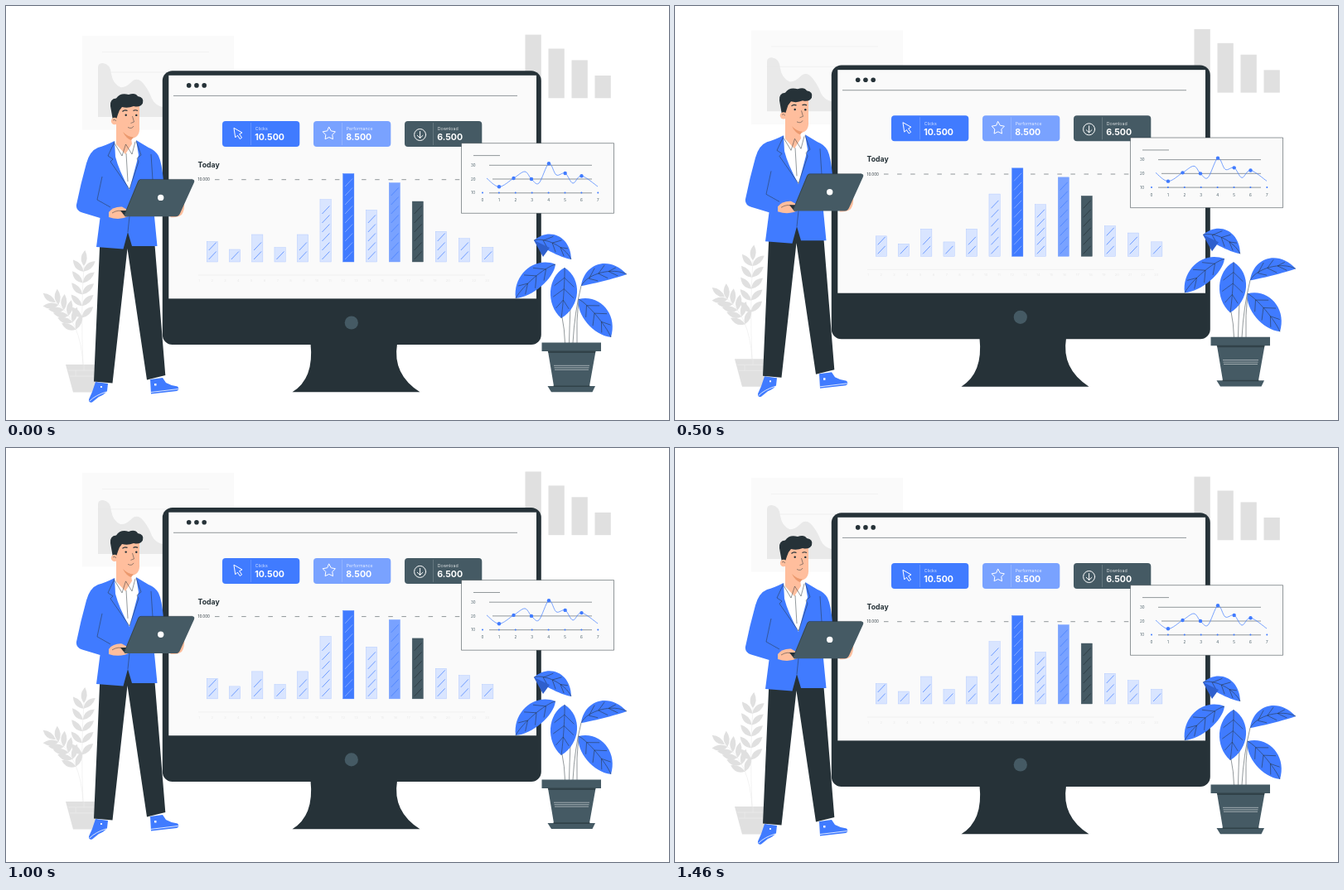
Write an HTML page that moves like this. It is 800x500 px and loops after 1500 ms.

```html
<!DOCTYPE html>
<html lang="en">
<head>
<meta charset="utf-8">
<title>Dashboard</title>
<style>
  html, body { margin: 0; width: 100%; height: 100%; overflow: hidden; background: #fff; }
  svg { display: block; width: 100vw; height: 100vh; }
  text { font-family: Inter, sans-serif; }
  .blue { fill: #407bff; }
  .dark { fill: #263238; }
  .slate { fill: #455a64; }
  .skin { fill: #ffbe9d; }
  .pale { fill: #e0e0e0; }
  .paper { fill: #fafafa; }
  .ink { fill: none; stroke: #263238; stroke-width: .5; stroke-linejoin: round; }
  .mist { fill: none; stroke: #e6e6e6; stroke-width: .5; }
  .icon { fill: none; stroke: #fff; stroke-linejoin: round; stroke-linecap: round; }
</style>
</head>
<body>
<svg viewBox="0 0 800 500">
<g id="scene">
  <!-- background charts -->
  <rect class="paper" x="92" y="36" width="183" height="113.5"/>
  <path d="M111 134V74Q111 69 117 69Q126 70 127 82Q129 94 138 98Q144 99 150 93Q158 84 166 94Q173 103 176 112Q180 120 189 122V134Z" fill="#e9e9e9"/>
  <path class="mist" d="M116 55.7H245M111 80H245"/>
  <g id="steps" class="pale"></g>

  <!-- pale plant -->
  <g id="shrub" class="pale"></g>
  <path class="pale" d="M72 433H115L108 466.5H81Z"/>
  <path d="M75 440H112M77 447H112M84 440V447M94 433V440" fill="none" stroke="#ededed" stroke-width=".6"/>

  <!-- monitor -->
  <path class="dark" d="M367.5 408Q372 450 345.5 466.3H499.5Q466 445 472 408Z"/>
  <rect class="dark" x="188.8" y="78.2" width="457" height="330.8" rx="12"/>
  <rect class="paper" x="196.3" y="83.8" width="443.7" height="269.6"/>
  <circle class="slate" cx="416.8" cy="382.5" r="8.1"/>
  <g id="windowDots" class="dark"></g>
  <path class="ink" d="M202 108.4H617"/>

  <g id="tiles"></g>
  <path class="icon" d="M275.3 147.5L285 153L281.6 154.7L284.6 159L282.2 160.6L279.4 156.2L277 158.6Z"/>
  <path class="icon" id="star"/>
  <circle class="icon" cx="499.6" cy="155.5" r="7"/>
  <path class="icon" d="M499.6 151.5V159.5M496.3 156.4L499.6 159.5L502.9 156.4"/>

  <text class="dark" x="231.6" y="195" font-size="8.7" font-weight="700">Today</text>
  <text class="dark" x="231.6" y="211.4" font-size="4.5">10.000</text>
  <path class="ink" d="M252 209.7H549" stroke-dasharray="5.5 10.6"/>
  <g id="bars"></g>
  <path class="mist" d="M232 325H578"/>
  <g id="hours" font-size="4" fill="#e8e8e8" text-anchor="middle"></g>

  <!-- line chart card -->
  <rect class="ink" x="549.5" y="165.7" width="184" height="84.6" style="fill:#fafafa"/>
  <path class="ink" d="M564 180.6H596M583 192.3H707M587 209H707M583 225.8H707"/>
  <path id="trend" fill="none" stroke="#407bff" stroke-width=".7"/>
  <g id="marks" class="blue"></g>
  <g id="scales" class="slate" font-size="4.5" text-anchor="middle"></g>

  <!-- potted plant -->
  <path class="ink" d="M671 376Q674 390 674.5 407M681 364Q680 386 679.5 407M684 407Q686 370 694 338M691 354Q688 380 689 407"/>
  <g id="foliage"></g>
  <path d="M637 283L648 303L656 292Z" fill="#2f5fcc"/>
  <path class="slate" d="M646.5 406.5H718V417H711.5L704 459H711L707.5 466.2H658L653.5 459H661L654 417H646.5Z"/>
  <path class="dark" d="M653.5 416.5H711.5L711 419H654.5ZM660 458.4H705L704 460H661Z" opacity=".6"/>
  <path d="M661 434.3H704M661.5 436.8H703.5M662 439.2H703" stroke="#fff" stroke-width=".5"/>

  <!-- man -->
  <path class="blue" d="M108 454L123 456L122 465Q118 470 112 472L104 478.5Q100 480 100 475L104 466Z"/>
  <path class="blue" d="M174 451L189 449L193 455Q200 459 207 459.5Q210 463 206 465L175 468.5Z"/>
  <path d="M101 477Q108 470 121 466M175 466.5L208 462.5" fill="none" stroke="#fff" stroke-width=".8"/>
  <path d="M114 459h2v2h-2zM179 456h2.5v2.5h-2.5z" fill="#fff"/>
  <path class="dark" d="M114 270H178L192.3 446L170 451.5L146.5 293L128.5 455.5L106 453.5Z"/>
  <path class="skin" d="M130 114H161V146Q162 159 151 160L153 172L144 180L133 170V140Z"/>
  <path d="M141 152Q147 158 154 158.5L151 162Q145 160 141 152Z" fill="#eb996e"/>
  <path d="M131 165L144 179L155 162L163 172L152 222L147 222Z" fill="#fff"/>
  <path class="blue" d="M131 163Q119 169 111 171Q101 175 97 190Q90 215 85 240Q84 247 92 249.5L113.5 256L109 291L141.5 293.5L147 273L152 290L182.5 290L179 254L190 211Q188 189 184 181Q180 174 172 171L157 162L160 180L149 222Q136 198 132 182Z"/>
  <path class="ink" d="M131 164L123 181L129 185L126 188L149 221M157 163L163 180L158 184L160 188L149 221M131 166L140 181L144.5 167L152 179L156 164M145 178L147 212M116 206L110 234L126 243M175 179L177 210M149 254L147 273"/>
  <path class="dark" d="M129 138L126 121Q125 112 133 111.5Q138 104 148 107Q156 104 159 109Q167 110 165 117.5Q162 123 154 121Q147 124 140 122Q136 126 135 131L133 137Z"/>
  <circle class="skin" cx="131" cy="139" r="4.2"/>
  <path class="ink" d="M152.5 133L154.5 140L150.5 141.5M147 146.5Q152 149 154 145M129 138Q131 136 133 139"/>
  <path class="ink" d="M140.5 127.5Q143 125 146.5 126.5M153.5 126.5Q156 125 159 126.5" style="stroke-width:1.2"/>
  <g class="dark"><circle cx="144.7" cy="131.7" r="1.2"/><circle cx="157.3" cy="131.9" r="1.2"/></g>
  <path class="skin" d="M215 237Q216 246 212 252Q206 256 198 255Z"/>
  <path class="skin" d="M124 249Q129 242 140 242.5L148 247L151 252Q139 260 124 255Z"/>
  <path class="dark" d="M138 247H147V254.2H144Q141 251 138 247Z"/>
  <path class="slate" d="M162 209.4H225.5Q228 210 227 213L210 250.5Q208.5 254.2 205 254.2H144Q142 254 143 251L159 212Q160 209.4 162 209.4Z"/>
  <path class="ink" d="M143 252L160 211Q161 209.4 163 209.4H225M128 250Q136 245 143 249"/>
  <circle cx="186.7" cy="231.4" r="3.7" fill="#fff"/>
</g>
</svg>
<script>
const byId = id => document.getElementById(id);
const fill = (id, parts) => { byId(id).innerHTML = parts.join(''); };
const range = (n, make) => Array.from({ length: n }, (_, i) => make(i));
const rect = (x, y, w, h, extra = '') => `<rect x="${x}" y="${y}" width="${w}" height="${h}" ${extra}/>`;
const dot = (x, y, r) => `<circle cx="${x}" cy="${y}" r="${r}"/>`;

fill('steps', [76.7, 59.8, 45.9, 27.3].map((h, i) => rect(626.5 + i * 28, 111.3 - h, 19.3, h)));
fill('windowDots', range(3, i => dot(220.7 + i * 9.25, 95.9, 2.8)));

// A twig curves from the pot to its tip, with leaf pairs along it
function twig(bendX, bendY, tipX, tipY) {
  const rootX = 93, rootY = 433, pairs = 5;
  const mix = (a, b, c, s) => a * (1 - s) ** 2 + 2 * b * s * (1 - s) + c * s * s;
  const slope = (a, b, c, s) => (b - a) * (1 - s) + (c - b) * s;
  const leaves = range(pairs * 2 + 1, i => {
    const s = .4 + .6 * Math.ceil(i / 2) / pairs;
    const turn = i === 0 ? 0 : i % 2 ? 45 : -45;
    const along = i === 0 ? 1 : s - .06;
    const angle = Math.atan2(slope(rootY, bendY, tipY, along), slope(rootX, bendX, tipX, along)) * 180 / Math.PI;
    return `<path transform="translate(${mix(rootX, bendX, tipX, along)} ${mix(rootY, bendY, tipY, along)}) rotate(${angle + turn})" d="M0 0Q9 -8 19 0Q9 6 0 0"/>`;
  });
  return `<path class="mist" d="M${rootX} ${rootY}Q${bendX} ${bendY} ${tipX} ${tipY}"/>${leaves.join('')}`;
}
fill('shrub', [twig(90, 380, 60, 358), twig(90, 370, 94, 314)]);

// A leaf from base to tip, bulging a to its left and b to its right, with veins
function leaf(x0, y0, x1, y1, a, b) {
  const size = Math.hypot(x1 - x0, y1 - y0), angle = Math.atan2(y1 - y0, x1 - x0) * 180 / Math.PI;
  const side = h => `C${size * .2} ${h / .75} ${size * .75} ${h / .75} ${size} 0`;
  const edge = (s, h) => 4 * s * (1 - s) * h;
  const mid = (b - a) / 2;
  const veins = [.2, .42, .64].map(s => [-a, b].map(h =>
    `M${s * size} ${edge(s, mid)}L${(s + .17) * size} ${edge(s + .17, mid + (h - mid) * .8)}`).join('')).join('');
  return `<g transform="translate(${x0} ${y0}) rotate(${angle})">
    <path class="blue" d="M0 0${side(-a)}M0 0${side(b)}"/>
    <path class="ink" d="M0 0${side(mid)}${veins}"/></g>`;
}
fill('foliage', [
  leaf(637, 283, 682, 306, 18, 3), leaf(663, 312, 615, 353, 9, 18), leaf(674, 316, 670, 377, 17, 15),
  leaf(694, 338, 749, 324, 20, 1), leaf(691, 354, 730, 400, 18, 11)
]);

const tiles = [['#407bff', 'Clicks', '10.500'], ['#79a2ff', 'Performance', '8.500'], ['#455a64', 'Download', '6.500']];
fill('tiles', tiles.map(([color, label, value], i) => {
  const x = 261 + i * 110;
  return `${rect(x, 139, 93.3, 31, `rx="4" fill="${color}"`)}
    <path d="M${x + 34.5} 141V168" stroke="#fff" stroke-width=".3" opacity=".6"/>
    <g fill="#fff"><text x="${x + 39.8}" y="150.2" font-size="5.3" font-weight="300">${label}</text>
    <text x="${x + 39.2}" y="162.2" font-size="10.6" font-weight="700">${value}</text></g>`;
}));

const star = range(10, i => {
  const r = i % 2 ? 4.2 : 8, a = i * Math.PI / 5;
  return `${389.8 + r * Math.sin(a)} ${154.3 - r * Math.cos(a)}`;
});
byId('star').setAttribute('d', `M${star.join('L')}Z`);

const BASE = 309;
const heights = [24.5, 15, 33, 17.4, 33, 75.3, 106.5, 62.6, 95.5, 73, 36.7, 28.3, 17.5];
const accents = { 6: ['#407bff', '#9dbbff'], 8: ['#79a2ff', '#407bff'], 9: ['#455a64', '#263238'] };
fill('bars', heights.map((h, i) => {
  const x = 242.2 + 27.1 * i + .05 * i * i;
  const [color, hatch, edge = color] = accents[i] || ['#d9e5ff', '#407bff', '#a9c3ff'];
  const lines = range(Math.ceil((h - 13) / 11), k => `M${x + 2.5} ${BASE - 3 - k * 11}l9 -9.5`);
  return `${rect(x, BASE - h, 13.3, h, `fill="${color}" stroke="${edge}" stroke-width=".4"`)}
    <path d="${lines.join('')}" stroke="${hatch}" stroke-width=".7"/>`;
}));
fill('hours', range(23, i => `<text x="${233 + i * 15.8}" y="333">${i + 1}</text>`));

// Smooth trend through marked nodes and unmarked bends
const nodes = [
  [580, 208], [595, 218.3, 1], [612.5, 208, 1], [626, 200], [634, 209, 1], [643, 214],
  [655, 190.3, 1], [664, 204], [674.7, 202, 1], [684, 214], [694.5, 205.2, 1], [714, 218]
];
const node = i => nodes[Math.max(0, Math.min(nodes.length - 1, i))];
const handle = (i, sign) => [0, 1].map(k => node(i)[k] + sign * (node(i + 1)[k] - node(i - 1)[k]) / 6);
const curve = range(nodes.length - 1, i => `C${handle(i, 1)} ${handle(i + 1, -1)} ${node(i + 1).slice(0, 2)}`);
byId('trend').setAttribute('d', `M${nodes[0]}${curve.join('')}`);

const dayX = i => 575 + i * 19.9;
fill('marks', [
  ...range(8, i => dot(dayX(i), 225.6, 1)),
  ...nodes.filter(n => n[2]).map(([x, y]) => dot(x, y, 2.2))
]);
fill('scales', [
  ...range(8, i => `<text x="${dayX(i)}" y="236.2">${i}</text>`),
  ...range(3, i => `<text x="563.7" y="${194 + i * 16.7}">${30 - i * 10}</text>`)
]);

// Linear float up and down, stepped at 24 poses per second
const LOOP = 1500, STEPS = 36, RISE = 10;
const scene = byId('scene');
const start = performance.now();
function draw() {
  const t = (performance.now() - start) % LOOP;
  const step = Math.floor((t + 5) * STEPS / LOOP) % STEPS;
  const phase = (step + .5) / STEPS;
  const lift = RISE * (1 - Math.abs(1 - 2 * phase));
  scene.setAttribute('transform', `translate(0 ${(.28 - lift).toFixed(2)})`);
  requestAnimationFrame(draw);
}
draw();
</script>
</body>
</html>
```
